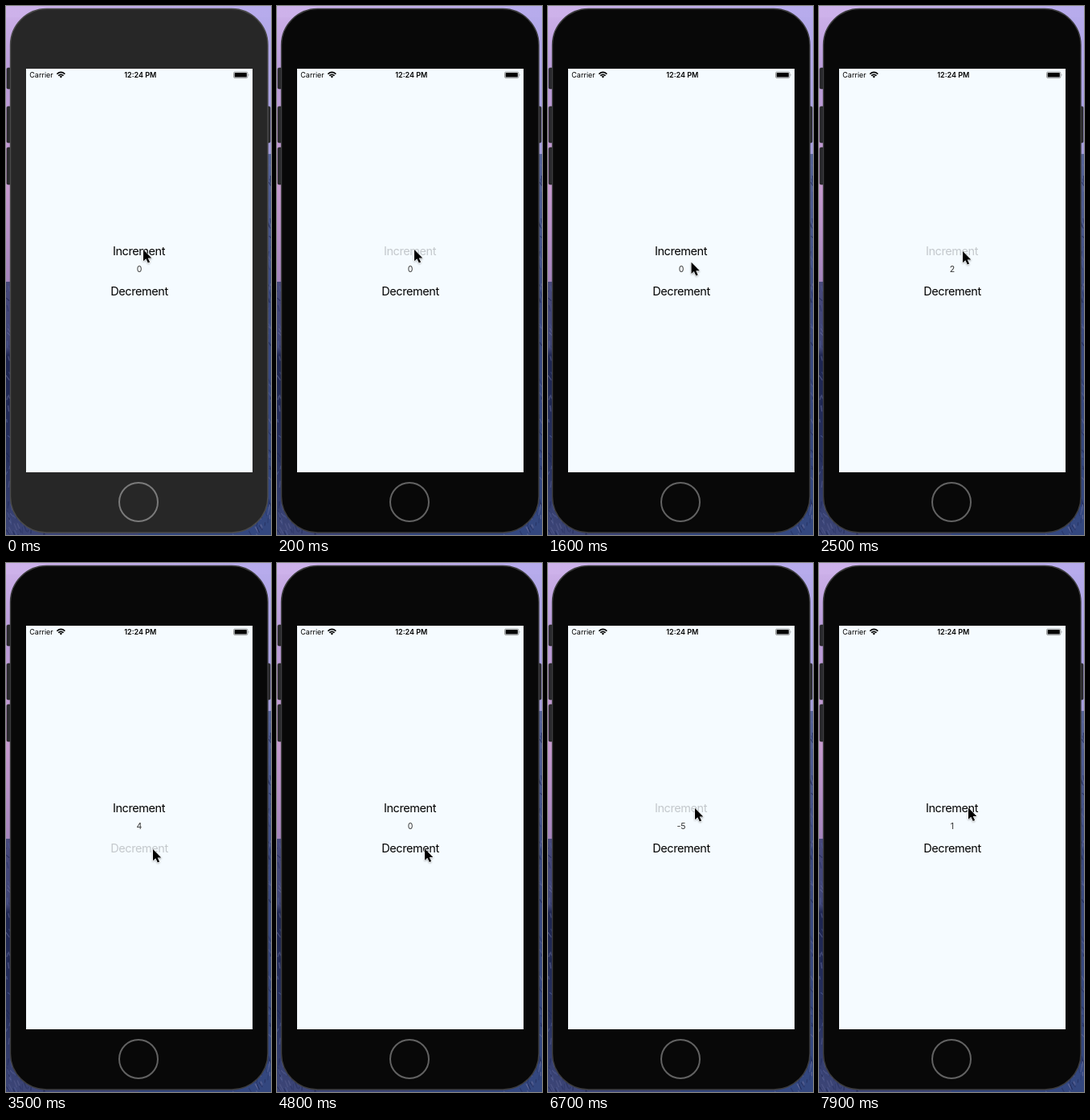
An HTML page that plays this animation: 330 by 658 pixels, repeating every 8 s.

```html
<!DOCTYPE html>
<html lang="en">
<head>
<meta charset="utf-8">
<title>Counter</title>
<style>
  html, body { margin: 0; width: 100%; height: 100%; overflow: hidden; background: #2b3a6c; }
  svg { display: block; width: 330px; height: 658px; --bezel: #272727; --ring: #7a7a7a; --rim: #4a4a4a; }
  svg.active { --bezel: #080808; --ring: #626262; --rim: #3c3c3e; }
  text { font-family: Inter, "Liberation Sans", sans-serif; fill: #000; }
  .mid { text-anchor: middle; }
  .status { font-size: 9px; }
  .button { font-size: 14.5px; letter-spacing: -.42px; }
  #count { font-size: 10.5px; fill: #333; }
</style>
</head>
<body>
<svg id="stage" viewBox="0 0 330 658">
  <defs>
    <linearGradient id="skyLeft" x2="0" y2="1">
      <stop offset="0" stop-color="#ceb2ea"/>
      <stop offset=".25" stop-color="#b89bd8"/>
      <stop offset=".65" stop-color="#c69bcf"/>
      <stop offset="1" stop-color="#a585bd"/>
    </linearGradient>
    <linearGradient id="skyRight" x2="0" y2="1">
      <stop offset="0" stop-color="#b6abec"/>
      <stop offset="1" stop-color="#a29bd8"/>
    </linearGradient>
    <linearGradient id="skyTop">
      <stop offset="0" stop-color="#ceb2ea"/>
      <stop offset="1" stop-color="#b6abec"/>
    </linearGradient>
    <linearGradient id="rockLeft" x2="0" y2="1">
      <stop offset="0" stop-color="#48497c"/>
      <stop offset=".27" stop-color="#3f4576"/>
      <stop offset=".3" stop-color="#1d2550"/>
      <stop offset=".7" stop-color="#27315f"/>
      <stop offset="1" stop-color="#3d4678"/>
    </linearGradient>
    <linearGradient id="rockRight" x2="0" y2="1">
      <stop offset="0" stop-color="#566398"/>
      <stop offset=".4" stop-color="#3b4a80"/>
      <stop offset="1" stop-color="#33477f"/>
    </linearGradient>
    <filter id="soft" x="-50%" y="-50%" width="200%" height="200%">
      <feDropShadow dx="0" dy="1" stdDeviation="1" flood-opacity=".35"/>
    </filter>
  </defs>

  <rect width="165" height="345" fill="url(#skyLeft)"/>
  <rect x="165" width="165" height="190" fill="url(#skyRight)"/>
  <rect width="330" height="14" fill="url(#skyTop)"/>
  <path d="M0 343L165 340V658H0Z" fill="url(#rockLeft)"/>
  <path d="M165 190L330 184V658H165Z" fill="url(#rockRight)"/>
  <g id="rocks" stroke-width="1.2"/>

  <g fill="#29292c" stroke="#1b1b1e" stroke-width=".6">
    <rect x="1" y="77" width="7" height="26" rx="1.5"/>
    <rect x="1" y="125" width="7" height="45" rx="1.5"/>
    <rect x="1" y="176" width="7" height="46" rx="1.5"/>
    <rect x="322" y="125" width="7" height="45" rx="1.5"/>
  </g>
  <rect x="5.5" y="3.5" width="320.5" height="651.5" rx="45" fill="var(--bezel)" stroke="var(--rim)" stroke-width="1.4"/>
  <circle cx="165" cy="617" r="24" fill="none" stroke="var(--ring)" stroke-width="2"/>
  <rect x="25" y="78" width="282" height="502" fill="#f5fbff"/>

  <text class="status" x="29.3" y="89">Carrier</text>
  <text class="status mid" x="167.3" y="89" font-weight="600">12:24 PM</text>
  <g fill="none" stroke="#000" stroke-width="1.6">
    <path d="M63.4 84.6Q68.4 80.2 73.4 84.6"/>
    <path d="M65.2 86.7Q68.4 83.9 71.6 86.7"/>
  </g>
  <path d="M66.6 87.7Q68.4 86.2 70.2 87.7L68.4 89.6Z"/>
  <rect x="283.5" y="82" width="17.4" height="7.6" rx="1.6" fill="none" stroke="#777" stroke-width=".7"/>
  <rect x="284.6" y="83" width="15.2" height="5.6" rx=".7"/>
  <path d="M301.8 84.5Q303.2 85.8 301.8 87.1Z" fill="#666"/>

  <text class="button mid" id="inc" x="165.5" y="310">Increment</text>
  <text class="mid" id="count" x="166" y="330.8">0</text>
  <text class="button mid" id="dec" x="166" y="359.6">Decrement</text>

  <path id="cursor" filter="url(#soft)" stroke="#fff" stroke-width="1" paint-order="stroke"
    d="M0 0V14.2L3.3 11.2L5.8 16.6L8.1 15.6L5.7 10.4H10.3Z"/>
</svg>
<script>
const LOOP = 8000, STEP = 100, DIM = .2, HALF = .55;
const $ = id => document.getElementById(id);

// [time, value], held until the next entry
const counts = [[0, 0], [300, 1], [1100, 0],
  ...run(2300, 1, 4, 1), ...run(3600, 3, 4, -1),
  ...run(4900, -1, 6, -1), ...run(6700, -5, 7, 1)];
const incFade = [[0, 1], ...press(200, 400), ...press(2200, 3000), ...press(6600, 7800)];
const decFade = [[0, 1], ...press(1000, 1200), ...press(3500, 4300), ...press(4900, 6000)];

// [time, x, y] of the pointer tip
const path = [
  [0, 171, 303], [400, 171, 303], [800, 180, 355.5], [1200, 180, 355.5],
  [1800, 178, 306], [1900, 179, 305], [2900, 179, 305], [3300, 184, 382],
  [3500, 183, 356], [4700, 183, 356], [4800, 184, 355.5], [5900, 184, 355.5],
  [6000, 185, 364], [6400, 183, 315], [6500, 183, 305], [7400, 183, 305],
  [7900, 186, 304.5], [8000, 186, 304.5]
];

// Repeated clicks, 200 ms apart
function run(start, first, n, by) {
  return Array.from({ length: n }, (_, i) => [start + i * 200, first + i * by]);
}

function press(down, up) {
  return [[down, DIM], [up, HALF], [up + STEP, 1]];
}

function held(steps, t) {
  return steps.findLast(s => s[0] <= t)[1];
}

function pointAt(t) {
  const i = path.findIndex(p => p[0] > t);
  const [t0, x0, y0] = path[i - 1], [t1, x1, y1] = path[i];
  const k = (t - t0) / (t1 - t0), e = k * k * (3 - 2 * k);
  return [x0 + (x1 - x0) * e, y0 + (y1 - y0) * e];
}

function drawRocks() {
  let seed = 11;
  const rnd = () => (seed = seed * 16807 % 2147483647) / 2147483647;
  const tones = ["#6a6f9f", "#18204a", "#53619a", "#232d5c"];
  const line = (x, y) => {
    const el = document.createElementNS("http://www.w3.org/2000/svg", "path");
    el.setAttribute("d", `M${x} ${y}l${rnd() * 7 - 2} ${3 + rnd() * 6}`);
    el.setAttribute("stroke", tones[Math.floor(rnd() * tones.length)]);
    el.setAttribute("opacity", .3 + rnd() * .4);
    $("rocks").append(el);
  };
  for (let i = 0; i < 45; i++) line(rnd() * 6, 348 + rnd() * 290);
  for (let i = 0; i < 60; i++) line(324 + rnd() * 6, 190 + rnd() * 450);
  for (let i = 0; i < 90; i++) {
    const x = rnd() * 50;
    line(i % 2 ? x : 330 - x, 615 + rnd() * 42);
  }
}

function draw(ms) {
  const t = Math.floor(ms % LOOP / STEP) * STEP;
  const [x, y] = pointAt(t);
  $("stage").classList.toggle("active", t >= 200);
  $("count").textContent = held(counts, t);
  $("inc").setAttribute("opacity", held(incFade, t));
  $("dec").setAttribute("opacity", held(decFade, t));
  $("cursor").setAttribute("transform", `translate(${x} ${y})`);
}

drawRocks();
const start = performance.now();
function tick() {
  draw(performance.now() - start);
  requestAnimationFrame(tick);
}
tick();
</script>
</body>
</html>
```
